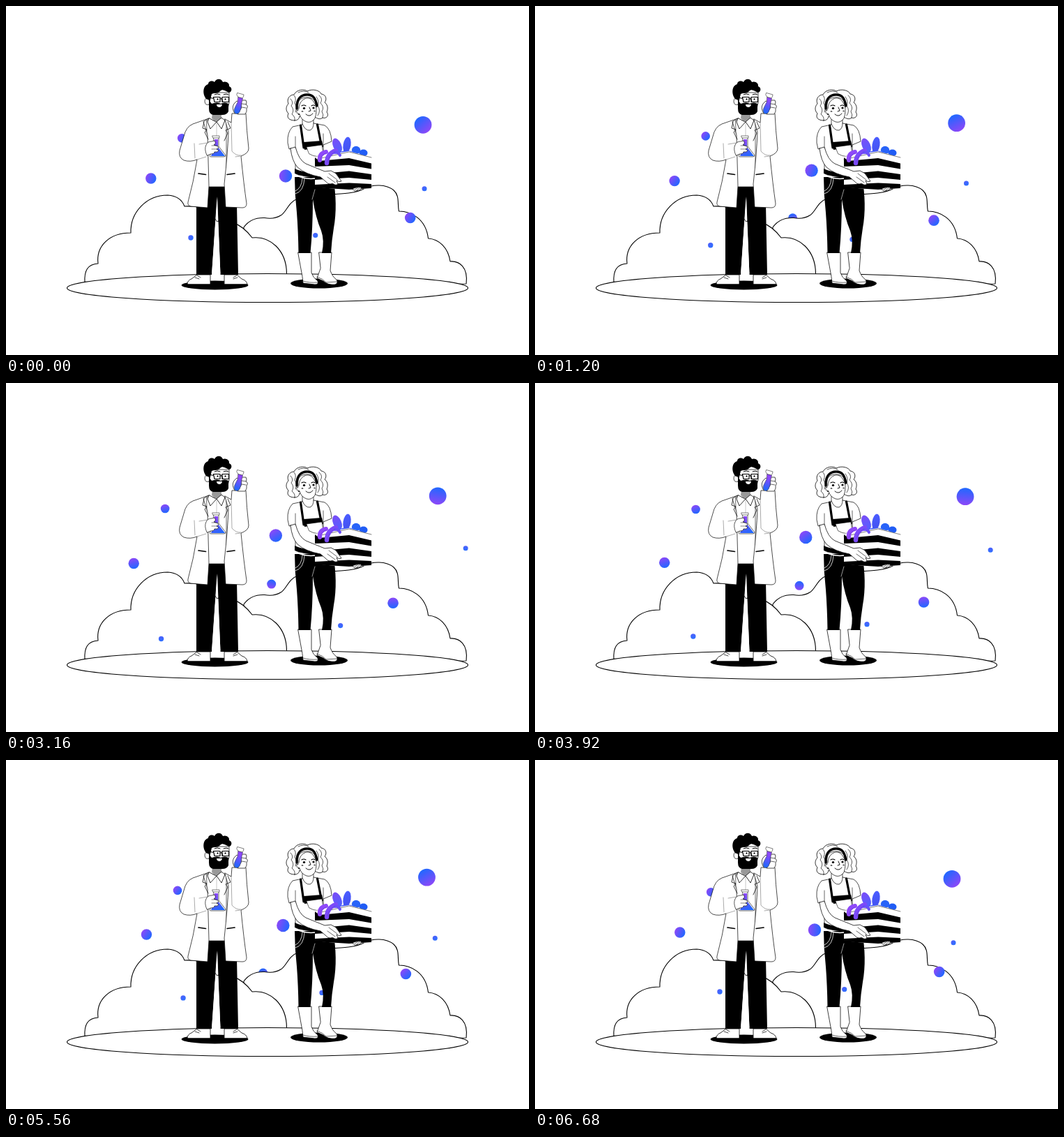
An HTML page with a canvas that plays this animation: 750 by 500 pixels, repeating every 6720 ms.

```html
<!DOCTYPE html>
<html lang="en">
<head>
<meta charset="utf-8">
<title>Scientist and farmer</title>
<style>
html, body { margin: 0; width: 100%; height: 100%; overflow: hidden; background: #fff; }
canvas { display: block; width: 750px; height: 500px; }
</style>
</head>
<body>
<canvas id="stage" width="750" height="500"></canvas>
<script>
const ctx = document.getElementById('stage').getContext('2d');
const LOOP = 6720, PEAK = 3230, TURN = 0.9;
const BLUE = '#1f68ff', VIOLET = '#8c48f8';

function draw(g, d, fill, line, width = 0.8) {
  const p = new Path2D(d);
  if (fill) { g.fillStyle = fill; g.fill(p); }
  if (line) { g.strokeStyle = line; g.lineWidth = width; g.stroke(p); }
}

const outline = (g, d, w) => draw(g, d, '#fff', '#000', w);
const solid = (g, d) => draw(g, d, '#000');
const line = (g, d, w = 0.7, color = '#000') => draw(g, d, null, color, w);

function oval(g, x, y, rx, ry, fill, stroke, turn = 0) {
  g.beginPath();
  g.ellipse(x, y, rx, ry, turn, 0, Math.PI * 2);
  if (fill) { g.fillStyle = fill; g.fill(); }
  if (stroke) { g.strokeStyle = stroke; g.lineWidth = 1.1; g.stroke(); }
}

function blend(g, x0, y0, x1, y1, from = VIOLET, to = BLUE) {
  const grad = g.createLinearGradient(x0, y0, x1, y1);
  grad.addColorStop(0, from);
  grad.addColorStop(1, to);
  return grad;
}

function layer(paint) {
  const c = document.createElement('canvas');
  c.width = 750;
  c.height = 500;
  const g = c.getContext('2d');
  g.lineJoin = g.lineCap = 'round';
  paint(g);
  return c;
}

function scenery(g) {
  outline(g, 'M341 317 C348 307 359 303 371 303.5 Q384 306 394 300 C402 296 405 280 419 276 C446 266 490 274 513 262 C526 255 545 255 556 264 C565 272 561 284 563.5 294 C580 294 602 304 605.5 333 C621 334 634 346 637 366 C650 365 663 374 660 398 L340 404 Z', 1.1);
  outline(g, 'M113 396 C112 379 117 370 132 369 C129 344 148 325 179 325 C178 296 201 271 232 271 C246 272 253 279 256 287 C281 286 296 292 302 309 C315 306 335 308 353 332 C379 329 402 350 402.5 383 L402 404 L113 404 Z', 1.1);
  oval(g, 375, 404, 287.5, 20.5, '#fff', '#000');
}

function man(g) {
  oval(g, 299.5, 400, 48, 6.4, '#000');
  // legs and shoes
  solid(g, 'M273 284 L290 258 L316 258 L331 284 L333 385 L307.5 385 L303 273 L295 385 L273 385 Z');
  draw(g, 'M302.5 274 L307.5 385 L295 385 Z', '#fff');
  line(g, 'M300 305 L302.5 309 L304 308', 0.8);
  outline(g, 'M260 398.5 Q260 393 266 391 L274 385 H293 V398.5 Z');
  outline(g, 'M313 398.5 V385 H331 L338 391 Q345 393 346 398.5 Z');
  line(g, 'M271 389 L277 391 M274 386 L279 389 M332 389 L326 391 M331 386 L326 389');
  // shirt and neck
  outline(g, 'M288 164 H316 V259 H290 Z', 0.6);
  draw(g, 'M296 153 H309 V161 L302 166 L295 161 Z', '#999');
  // coat
  outline(g, 'M291 161 L268 169 Q258 173 255 187 L249 207 Q247 217 255 221 Q264 224 274 220 Q269 252 261 281 Q260 286 265 287 L289 289 L291 258 L289 185 L283 166 Z', 0.7);
  outline(g, 'M314 162 L323 167 L324 154 H344 Q345 178 348 204 Q348 211 337 215 Q341 256 345 283 Q345 289 339 289 L315 288 L313 255 Q318 210 319 181 Z', 0.7);
  line(g, 'M270 197 L271 218 M274 220 L287 216 M277 198 L289 196 M323 167 L324 208 Q330 215 337 214 M336 215 L329 216', 0.5, '#555');
  line(g, 'M284 166 L282 175 L288 177 L285 181 L290 191 M318 166 L322 175 L315 178 L318 182 L313 193', 0.75);
  outline(g, 'M291 161 L289 166 L293 176 L302 166 L309 176 L314 164 L309 160 L302 166 Z', 0.8);
  line(g, 'M302 167 V193', 0.4, '#777');
  line(g, 'M276 240 L286.5 241.5 M317 241.5 L328 240', 1.7);
  // head
  outline(g, 'M290 124 H320 V139 Q318 152 307 154 Q294 152 291 141 Q286 143 285 137 Q285 130 291 133 Z', 0.7);
  solid(g, 'M288 134 C281 127 282 114 290 112 C290 108 295 106 299 109 C302 103 309 104 311 109 C316 107 321 111 320 115 C325 117 324 123 320 124 C314 122 311 118 307 122 C304 126 299 124 295 126 L292 139 Q291 133 288 134 Z');
  solid(g, 'M291 135 L295 140 Q303 137 308 140 Q314 137 319 140 L319 151 Q317 156 310 156 H297 Q291 155 291 147 Z');
  draw(g, 'M302 141 H310 Q309 145.5 305.5 145 Q302 144.5 302 141 Z', '#fff');
  line(g, 'M297.5 130.5 H307 V137.5 H299 Z M310 130.5 H319.5 V137.5 H310 Z M307 133 H310 M290 131 L298 132.5', 1.2);
  line(g, 'M299 127 Q303 124.5 307 127 M312 127 Q316 125 319 127 M309 132 L311 137', 1);
  oval(g, 303.5, 133.5, 1, 1.2, '#000');
  oval(g, 314.5, 133.5, 1, 1.2, '#000');
  // tall tube
  outline(g, 'M328 154 Q323 146 327 140 L331 136 L334 138 L331 143 L334 146 M338 135 L344 135 Q346 138 344 141 Q348 143 345 147 Q346 151 343 155 L332 155 L337 147 Z', 0.7);
  draw(g, 'M333 130 L339.5 132 L338 139 Q338 146 335 152 Q332 156 328.5 153.5 Q326 151 328 146 L332 138 Z', blend(g, 336, 136, 331, 153), '#333', 0.5);
  outline(g, 'M332 124.5 L341 127 L340.5 130 L338.5 132 L333 130.5 L331 127.5 Z', 0.5);
  line(g, 'M338 140 L344 141 M338 145 L344 146', 0.6);
  // flask
  outline(g, 'M298 188 H305 V201 L315 214 Q315 216 312 216 H294 Q291 216 293 213 L298 202 Z', 0.6);
  draw(g, 'M299 191 H304 V202 L314 215 H294 L298 205 Z', blend(g, 299, 193, 308, 215));
  outline(g, 'M296 186 H306 V189 H297 Z', 0.5);
  outline(g, 'M288 214 Q284 205 287 199 Q289 194 295 194 L299 193 Q302 197 298 199 L304 201 Q306 204 302 205 L305 207 Q304 210 299 209 Q299 212 294 212 Z', 0.65);
  line(g, 'M295 200 H301 M295 205 H302', 0.5);
}

function greens(g) {
  oval(g, 475, 200, 6, 11, blend(g, 471, 190, 480, 208, '#7a4df7', '#5360ff'), null, -0.4);
  oval(g, 489, 199, 5.5, 11.5, blend(g, 486, 190, 492, 208, '#4a5cff', '#4452f0'), null, 0.15);
  oval(g, 502, 206.5, 6.2, 5.8, '#2863f8');
  oval(g, 512.5, 210.5, 6, 5, '#205cf5');
  draw(g, 'M474 213 Q486 203 500 210 L492 215 Z', '#3d56f8');
}

function bananas(g) {
  line(g, 'M450 221 Q449 211 459 209', 6, '#8f49f9');
  line(g, 'M460 225 Q460 212 473 207', 6.5, '#7c4bf9');
  line(g, 'M472 210 Q477 209 479 214', 4, '#6a50fa');
  line(g, 'M451 221 Q451 213 459 211 M461 224 Q462 214 472 209', 0.5, '#5f38d8');
}

function woman(g) {
  oval(g, 449, 397.5, 41, 7, '#000');
  // boots
  outline(g, 'M419 353 H438 L438 382 Q440 389 447 394 Q449 399 443 399 L426 397 L425 388 Z', 0.75);
  outline(g, 'M449 353 H467 L465 379 Q468 388 474 392 Q477 397 472 399 Q461 400 455 394 L446 390 L451 376 Z', 0.75);
  line(g, 'M426 394 Q435 397 447 396 M446 388 Q455 391 459 396 L475 395', 0.6);
  // trousers
  solid(g, 'M414 245 H469 Q476 285 470 318 Q467 336 466 354 H453 Q457 336 452 322 Q444 303 440 277 Q440 318 436.5 354 H419.5 Q419 322 417 296 Q414 270 414 245 Z');
  line(g, 'M428 247 Q427 266 415 269 M425 247 Q424 261 415 265', 0.8, '#fff');
  line(g, 'M439 277 L443 263', 0.6, '#fff');
  // hair
  outline(g, 'M414 164 C406 164 402 160 405 154 C400 149 402 143 405 140 C402 133 407 127 413 127 C417 119 428 119 432 122 C440 118 450 121 452 126 C460 127 460 135 457 138 C463 143 461 149 460 152 C464 157 459 162 454 160 C450 164 444 160 442 158 L421 158 Q420 164 414 164 Z', 0.8);
  line(g, 'M408 133 Q413 138 409 143 Q414 149 410 155 Q415 159 414 163 M413 128 Q417 132 414 139 Q418 145 415 152 M449 128 Q455 133 451 139 Q457 145 453 151 Q456 156 454 160 M445 130 Q450 137 447 143 Q452 150 447 157 M419 124 Q427 120 434 124', 0.65);
  // neck, shirt and sleeves
  outline(g, 'M425 162 V170 L411 173 Q403 181 404 196 L406 205 L415 203 L415 242 H456 L455 199 L467 194 Q466 176 457 171 L441 168 V160 Z', 0.7);
  line(g, 'M425 169 Q429 179 436 178 Q441 176 441 168', 0.7);
  line(g, 'M415 187 V205 M455 183 V199', 0.6);
  // face
  outline(g, 'M419 149 Q417 134 425 132 Q436 128 443 136 Q447 150 443 161 Q438 168 431 166 Q423 163 421 155 Q416 155 417 150 Z', 0.7);
  line(g, 'M417 147 C416 132 424 127 432 127 C441 127 444 133 446 143', 3.3);
  line(g, 'M420 147 C420 137 428 131 434 132 Q441 133 445 145', 0.7);
  line(g, 'M424 143 Q427 141 430 143 M438 143 Q441 141 443 143', 1.1);
  oval(g, 427.5, 146.5, 1.7, 1.5, '#000');
  oval(g, 441, 146, 1.6, 1.5, '#000');
  oval(g, 425, 151, 1.5, 0.8, '#222');
  oval(g, 442.5, 150.5, 1.3, 0.8, '#222');
  line(g, 'M435 145 L437 150 L434 151 M430 155 Q435 160 440 154', 0.9);
  oval(g, 420, 155, 0.9, 0.9, '#000');
  // dungarees
  line(g, 'M422.5 171 L427 203', 3.2);
  line(g, 'M446.5 170 L451 193', 3.2);
  solid(g, 'M427 195 L453 193 L455 202 L428 206 Z');
  outline(g, 'M431 202 L453 199 L455 212 Q447 219 435 212 Z', 0.6);
  solid(g, 'M414 233 Q428 240 445 238 V245 Q428 246 414 240 Z');
  line(g, 'M414 241 Q427 249 444 247', 1.5, '#fff');
  // crate
  greens(g);
  draw(g, 'M443 216 L492 208 L524 217 V261 L492 264 L443 259 Z', '#fff');
  solid(g, 'M443 217 L449 222 L492 218 L524 225.5 V233.5 L492 228 L443 230 Z');
  solid(g, 'M443 241 L492 236.5 L524 241 V249 L492 246 L443 249 Z');
  solid(g, 'M443 256 L492 253.5 L524 255 V261 L492 263 L443 260 Z');
  line(g, 'M443 220 L492 209 L524 217', 0.5);
  bananas(g);
  // arm and hands
  outline(g, 'M408 204 L415 202 Q420 221 430 226 L457 237 L466 236 Q474 239 476 244 L481 251 Q478 253 474 250 L476 255 Q473 258 468 254 Q463 257 458 251 L451 245 Q429 241 418 231 Q410 222 408 204 Z', 0.75);
  line(g, 'M463 240 L475 249 M461 245 L472 253', 0.6);
  outline(g, 'M497 262 Q502 259 510 260 L507 264 L501 265 Z', 0.7);
  line(g, 'M500 263 L504 261 M503 264 L507 261', 0.6);
}

const back = layer(scenery);
const people = layer(g => { man(g); woman(g); });

// start x, y; end x, y; radius; gradient angle
const hidden = [[364.5, 311, 380.7, 288, 6.5, -2.2]];
const open = [
  [598, 170.3, 619.2, 161.8, 12.4, -2.3],
  [600, 261.8, 659.2, 236.8, 3.5, 0.8],
  [579.7, 303.5, 555, 315.2, 7.8, 0.6],
  [401, 243.5, 386.8, 218.4, 9.2, 0.1],
  [207.8, 247, 183.2, 258.5, 7.7, 0.4],
  [252.2, 189.3, 228.1, 180, 6.3, 0.4],
  [265, 332, 222.5, 366.5, 3.7, 0.6],
  [443.7, 328.5, 479.7, 347.6, 3.6, 0.8]
];

function ball([x0, y0, x1, y1, r, angle], p) {
  const x = x0 + (x1 - x0) * p, y = y0 + (y1 - y0) * p;
  const a = angle + p * TURN;
  const dx = Math.cos(a) * r, dy = Math.sin(a) * r;
  const small = r < 4;
  oval(ctx, x, y, r, r, blend(ctx, x - dx, y - dy, x + dx, y + dy, small ? '#4e60fb' : VIOLET, small ? '#2b70ff' : BLUE));
}

function progress(t) {
  const u = t < PEAK ? t / PEAK : (LOOP - t) / (LOOP - PEAK);
  return u * u * (3 - 2 * u);
}

function render(now) {
  const p = progress(now % LOOP);
  ctx.fillStyle = '#fff';
  ctx.fillRect(0, 0, 750, 500);
  hidden.forEach(b => ball(b, p));
  ctx.drawImage(back, 0, 0);
  open.forEach(b => ball(b, p));
  ctx.drawImage(people, 0, 0);
}

const start = performance.now();
function tick() {
  render(performance.now() - start);
  requestAnimationFrame(tick);
}
tick();
</script>
</body>
</html>
```
